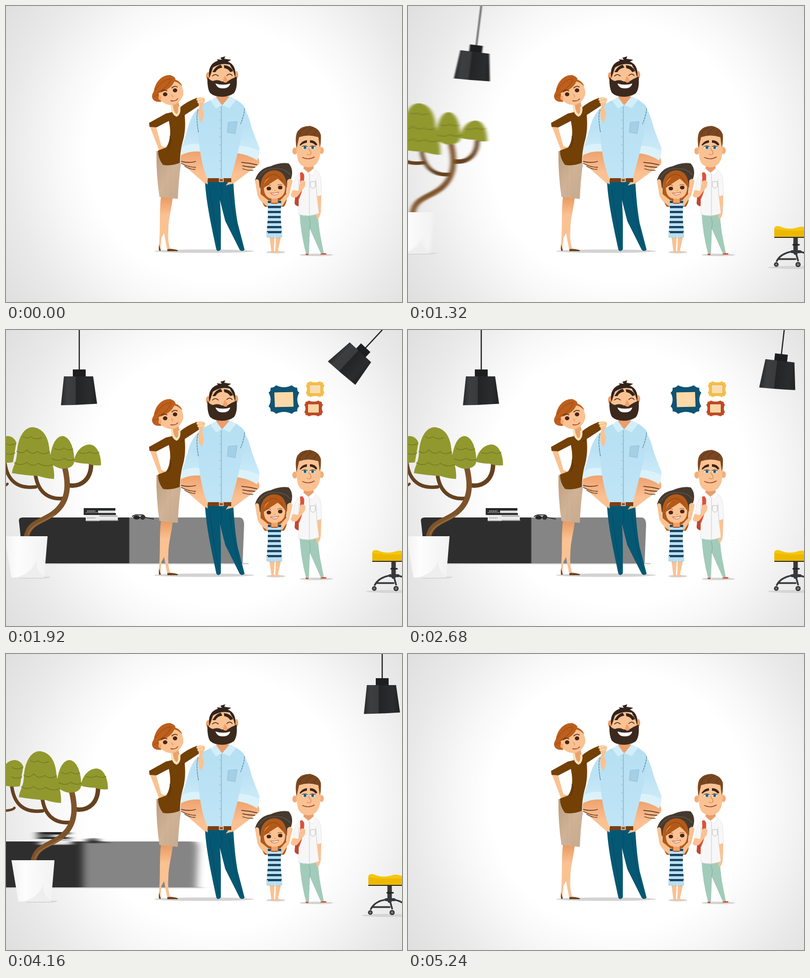
An HTML page for the animation above (5.28 s loop, 800 by 600 pixels).

```html
<!DOCTYPE html>
<html lang="en">
<head>
<meta charset="utf-8">
<title>Family at home</title>
<style>
html, body { margin: 0; width: 100%; height: 100%; overflow: hidden; background: #fff }
svg { display: block; width: 100vw; height: 100vh }
.line { fill: none; stroke-linecap: round; stroke-linejoin: round }
.skin { fill: #fac292 }
</style>
</head>
<body>
<svg viewBox="0 0 800 600">
<defs>
  <radialGradient id="room" gradientUnits="userSpaceOnUse" cx="425" cy="298" r="520">
    <stop offset=".5" stop-color="#fff"/><stop offset=".62" stop-color="#f8f8f8"/>
    <stop offset=".82" stop-color="#e9e9e9"/><stop offset="1" stop-color="#dfdfdf"/>
  </radialGradient>
  <linearGradient id="sleeve" x2="0" y2="1">
    <stop offset=".4" stop-color="#bbe2f4"/><stop offset="1" stop-color="#d3eefa"/>
  </linearGradient>
  <linearGradient id="shirt" x2="0" y2="1">
    <stop stop-color="#b6dff2"/><stop offset="1" stop-color="#bfe5f6"/>
  </linearGradient>
  <linearGradient id="forearm" x2="0" y2="1">
    <stop stop-color="#ee9f6a"/><stop offset=".7" stop-color="#fbc193"/>
  </linearGradient>
  <linearGradient id="skirt" x2="1" y2="1"><stop stop-color="#bd9c7e"/><stop offset=".5" stop-color="#d0b397"/><stop offset="1" stop-color="#c6a98d"/></linearGradient>
  <linearGradient id="leg" x2="0" y2="1"><stop stop-color="#e9985f"/><stop offset=".35" stop-color="#fac292"/></linearGradient>
  <linearGradient id="pot"><stop stop-color="#f1f1f1"/><stop offset=".3" stop-color="#fdfdfd"/><stop offset="1" stop-color="#f2f2f2"/></linearGradient>
  <linearGradient id="shade">
    <stop stop-color="#292a2c"/><stop offset=".17" stop-color="#3d3e40"/><stop offset=".4" stop-color="#3a3b3d"/>
    <stop offset=".42" stop-color="#232425"/><stop offset=".8" stop-color="#2b2c2d"/><stop offset="1" stop-color="#222"/>
  </linearGradient>
  <pattern id="stripes" width="40" height="10.2" y="395" patternUnits="userSpaceOnUse">
    <rect width="40" height="10.2" fill="#bce3f4"/><rect width="40" height="4.400" fill="#173c5b"/>
  </pattern>
  <g id="lamp">
    <path d="M0-40V90" stroke="#222" stroke-width="2.4"/>
    <path d="M-13 88h26v15h-26z" fill="#1d1e1f"/>
    <path d="M-31 102H28L36 157.500Q0 160-37 160.500Z" fill="url(#shade)"/>
  </g>
  <path id="scallop" d="M-27-24Q-20-24-16-29Q-8-25 0-25Q8-25 16-29Q20-24 27-24Q26-17 31-14Q27-7 27 0Q27 7 31 14Q26 17 27 24Q20 24 16 29Q8 25 0 25Q-8 25-16 29Q-20 24-27 24Q-26 17-31 14Q-27 7-27 0Q-27-7-31-14Q-26-17-27-24Z"/>
</defs>

<rect width="800" height="600" fill="url(#room)"/>

<g id="frames"><g>
  <g transform="translate(561.5 141)"><use href="#scallop" fill="#0f5474"/><path d="M-20-15L19-16 20 15-19 16Z" fill="#fbd9a9" stroke="#093f5a"/></g>
  <g transform="translate(624.5 120)"><use href="#scallop" fill="#f4bf48" transform="scale(.61 .55)"/><path d="M-11.500-9h23V9h-23z" fill="#fbdcae" stroke="#e5a52e"/></g>
  <g transform="translate(621.500 159)"><use href="#scallop" fill="#c04a25" transform="scale(.61 .55)"/><path d="M-12-9h23V9h-23z" fill="#fbd5a5" stroke="#9d3618"/></g>
</g></g>

<g id="sofa"><g>
  <path d="M30 472H490V475H60Z" fill="#d2d2d2"/>
  <path d="M26 386Q26 380 34 380H250V473H34Q30 420 26 386Z" fill="#2e2e2f"/>
  <path d="M249 380H472Q481 381 481 395L478 473H249Z" fill="#858585"/>
  <path d="M249 380V473" stroke="#555"/>
  <path d="M157 361H221V366H188V371H222V375H157Z" fill="#292a2b"/>
  <path d="M186 366H220V371H186Z" fill="#dcdcdc"/>
  <path d="M161 376H226V387H161Z" fill="#e9e9e9"/>
  <path d="M189 377H225M189 386H227M162 387H187M161 370h24" stroke="#8a8a8a" stroke-width="1.3"/>
  <path d="M164 381h17M164 367h17" stroke="#aaa" stroke-width="2" stroke-dasharray="3 1"/>
  <path d="M255 378Q262 373 270 375Q279 373 281 380L298 383" class="line" stroke="#333" stroke-width="2"/>
  <ellipse cx="264" cy="380" rx="7" ry="4" fill="#242424"/><ellipse cx="276" cy="380" rx="5" ry="4.500" fill="#303030"/>
</g></g>

<g id="tree"><g>
  <path d="M20 500H90Q88 504 70 504H30Z" fill="#d8d8d8"/>
  <g class="line" stroke="#65411f">
    <path d="M-20 318Q0 317 3 312" stroke-width="5"/>
    <path d="M-3 262C0 300 18 323 60 318" stroke-width="7"/>
    <path d="M59 290C63 325 82 346 120 341" stroke-width="7.500"/>
    <path d="M172 268C173 302 153 318 128 315" stroke-width="9"/>
    <path d="M41 422C45 390 73 388 94 373C125 351 129 318 118 276" stroke="#7d532b" stroke-width="11"/>
    <path d="M45 414C52 393 76 390 97 375" stroke="#94683a" stroke-width="3"/>
  </g>
  <g fill="#91982e">
    <path d="M-32 264C-26 232-12 214 5 215Q17 217 21 228L14 268Q0 271-32 264Z"/>
    <path d="M12 290C14 274 21 270 22 250C24 215 38 197 54 197C74 199 86 215 88 245C92 264 99 284 97 302Q80 301 66 296Q40 295 12 290Z"/>
    <path d="M88 269C90 240 98 215 115 215C130 217 138 242 138 266Q136 282 112 281Q100 279 88 269Z"/>
    <path d="M137 267C140 246 154 232 169 232C184 233 192 252 192 274Q178 276 165 271Q150 271 137 267Z"/>
  </g>
  <g class="line" stroke="#777b25" stroke-width="1.5">
    <path d="M35 216Q43 222 50 216Q60 224 72 218"/>
    <path d="M22 246Q33 253 42 243Q53 255 64 246Q75 255 88 247"/>
    <path d="M17 269Q31 277 42 268Q53 279 65 270Q80 279 94 273"/>
    <path d="M98 240Q108 246 117 239Q126 246 135 241M93 261Q107 268 117 260Q128 267 138 262"/>
    <path d="M148 248Q159 253 169 247Q179 253 188 248M-2 230Q9 236 20 230M-3 249Q8 255 18 249"/>
  </g>
  <path d="M-3 418H84L77 502H11Z" fill="url(#pot)"/>
  <path d="M12 502Q50 500 64 462Q56 484 77 500V502Z" fill="#eee"/>
</g></g>

<g id="people">
  <g fill="#d3d3d3">
    <ellipse cx="400" cy="497" rx="101" ry="3.500"/><ellipse cx="545" cy="499" rx="19" ry="2.500"/><ellipse cx="627" cy="504.500" rx="34" ry="2.500"/>
  </g>

  <g id="man">
    <path d="M402 354H459C461 385 463 412 468 440L482 494Q477 499 472 494L443 436 432 393C435 425 434 462 434 493Q429 500 425 494C417 455 404 400 402 354Z" fill="#055873"/>
    <path d="M432 393Q440 385 433 360M412 372Q419 430 430 485M452 372Q459 435 475 486" class="line" stroke="#084660"/>
    <path d="M355 298Q351 306 354 318L402 360 411 354 398 290Z" fill="url(#forearm)"/>
    <path d="M466 293L510 308Q513 316 511 321L459 360 449 362 454 346Z" fill="url(#forearm)"/>
    <path d="M401 349L409 351 407 362 400 356M459 349L451 354 444 364 456 360" class="skin"/>
    <path d="M394 204C378 213 370 235 367 249L354 290Q354 297 356 301Q372 292 393 295L404 230ZM474 199C487 211 492 230 497 249L512 288Q511 306 507 313Q490 301 464 298L462 225Z" fill="url(#sleeve)"/>
    <path d="M356 286Q372 277 392 280L393 295Q372 293 354 302ZM467 283Q490 283 511 294L508 312Q490 300 466 298Z" fill="#dcf2fb"/>
    <path d="M415 190L462 188Q483 201 483 209C481 245 471 290 454 350H407C393 320 388 270 384 216Q388 202 415 190Z" fill="url(#shirt)"/>
    <path d="M425 183H450L452 188 437 201 424 190Z" fill="#ea9e6c"/>
    <path d="M424 184L436 201 424 208 413 192ZM452 183L437 201 452 207 465 190Z" fill="#d2eefa"/>
    <path d="M435 203V348" stroke="#7da9c3" stroke-width="1.200"/>
    <path d="M432 214V346" stroke="#88b2ca" stroke-width="1.600" stroke-dasharray="1.600 15"/>
    <path d="M449 236L467 234 463 259 447 256Z" fill="#a4cfe4" stroke="#93c0da"/>
    <path d="M388 210Q383 224 389 257M482 208Q481 222 474 239" class="line" stroke="#527e9a" stroke-width="1.200" stroke-dasharray="4 2"/>
    <path d="M408 349H455V357H407Z" fill="#7b3f17"/><path d="M431 350h8v6h-8z" fill="#8b532e" stroke="#ead9b8" stroke-width="1.500"/>
    <path d="M354 315Q369 319 383 315M354 319Q369 327 383 327M361 325Q374 332 382 331M476 317Q492 318 507 322M478 324Q490 327 503 327M478 330Q489 334 499 333" class="line" stroke="#4a2a1b" stroke-width="1.300"/>
    <ellipse cx="408.500" cy="142" rx="4.500" ry="8" fill="#ef9f6a"/><ellipse cx="465" cy="140" rx="4" ry="8" fill="#ef9f6a"/>
    <path d="M412 126Q436 107 462 127L464 158H410Z" class="skin"/>
    <path d="M411 146C408 130 412 116 428 111L426 108 436 109 433 105 443 102 441 107 455 109 448 113C461 117 465 130 463 145L459 131 452 119Q434 114 418 125Z" fill="#33231a"/>
    <path d="M407 143Q411 151 418 152Q428 148 436 153H447Q456 147 466 143Q468 168 460 177Q450 184 437 184Q420 184 412 176Q406 166 407 143Z" fill="#3c291d"/>
    <path d="M423 157Q439 162 453 157Q451 167 438 167Q426 167 423 157Z" fill="#fff"/>
    <path d="M417 134Q424 121 434 119L437 125Q427 126 423 134ZM440 120Q453 120 459 132L453 134Q449 127 441 126Z" fill="#33231a"/>
    <path d="M417 142Q423 136 429 142M446 141Q452 135 457 141" class="line" stroke="#43271b" stroke-width="1.600"/>
    <path d="M442 141Q450 151 446 155Q440 156 438 152" fill="#f0a06c"/>
  </g>

  <g id="woman">
    <path d="M313 386L336 386Q332 412 327 430Q326 452 314 470L312 495 308 493C313 455 309 420 313 386Z" fill="url(#leg)"/>
    <path d="M316 386H337C335 410 328 430 328 454Q326 475 332 494L326 495C321 470 314 440 316 386Z" fill="url(#leg)"/>
    <path d="M309 483L313 496H309ZM326 493Q334 491 347 495V497H326Z" fill="#704019"/>
    <path d="M304 294H351L353 322Q349 350 347 391L310 387Q303 340 304 294Z" fill="url(#skirt)"/>
    <path d="M322 299V386M332 310V389" stroke="#bd9e82" stroke-dasharray="2 1" opacity=".5"/>
    <path d="M290 242L302 241 314 284 327 288 330 291 315 295 309 292Z" class="skin"/>
    <path d="M333 198L348 193 353 213 341 224 335 218Z" fill="#eda16d"/>
    <path d="M336 215L323 218 289 237 290 245 304 246 329 233Q333 252 331 265Q329 280 323 287L307 293Q307 309 317 322Q333 325 351 318C352 302 353 289 357 275Q364 252 361 221L390 202 386 186Q364 194 350 207L344 222Z" fill="#734006"/>
    <path d="M331 264Q337 272 328 288M361 221L354 226" class="line" stroke="#4f2a05"/>
    <path d="M335 203Q337 219 345 222Q351 217 350 206" class="line" stroke="#f5e5b9" stroke-width="5" stroke-dasharray=".1 3.500"/>
    <path d="M385 188Q393 182 402 188Q402 196 396 204L400 220 396 237 390 230 388 214 391 202Z" class="skin"/>
    <path d="M386 190l11-3M388 195l10-2" class="line" stroke="#f3dfad" stroke-width="3" stroke-dasharray=".1 3"/>
    <path d="M309 169Q325 147 347 151Q360 165 358 180Q353 195 340 200Q326 203 314 193L308 185Z" class="skin"/>
    <path d="M314 194Q297 196 295 184C295 177 298 176 299 171C303 151 317 139 332 140Q343 144 342 149Q354 154 356 163Q348 154 340 153C335 165 321 174 309 176Q307 183 314 194Z" fill="#bd5f1d"/>
    <path d="M301 171Q315 149 334 147M307 175Q326 166 333 150M299 184Q304 179 309 180" class="line" stroke="#96460f"/>
    <ellipse cx="311" cy="186" rx="3" ry="4.500" fill="#f1aa76"/>
    <path d="M314 173Q319 168 325 172M335 166Q340 161 346 164" class="line" stroke="#6e3619" stroke-width="1.800"/>
    <g fill="#4a2413"><ellipse cx="321.500" cy="179" rx="4.500" ry="4"/><ellipse cx="341.500" cy="171" rx="4.500" ry="4"/></g>
    <path d="M334 180Q338 182 336 185" class="line" stroke="#df8b59" stroke-width="1.300"/>
    <path d="M333 192Q342 194 347 188" class="line" stroke="#b84a30" stroke-width="1.800"/>
  </g>

  <g id="girl">
    <path d="M503 354C506 342 515 328 534 325Q554 316 571 319Q582 331 576 350L573 366 544 374 514 370Z" fill="#463a2e"/>
    <path d="M510 348Q523 328 543 330Q563 328 574 342" class="line" stroke="#5d5046" stroke-width="1.500"/>
    <path d="M514 372C513 346 526 333 543 333C562 334 570 353 566 378Q570 397 561 407H523Q514 397 514 372Z" fill="#b35a1a"/>
    <path d="M503 354Q507 348 511 354L514 381 530 394 529 407Q512 396 508 384ZM568 354Q575 346 579 355L572 384 557 407 553 395 567 380Z" class="skin"/>
    <path d="M536 385h13v14h-13z" fill="#eda16d"/>
    <path d="M521 365Q523 346 543 346Q562 348 564 366Q564 384 552 389Q541 393 531 389Q520 383 521 365Z" class="skin"/>
    <path d="M519 370Q523 348 545 342Q562 345 566 370Q561 359 549 350Q533 360 519 370Z" fill="#b35a1a"/>
    <path d="M524 352Q533 338 545 342M558 355Q554 346 545 342" class="line" stroke="#8d420f"/>
    <path d="M526 364q5-3 9 0M549 363q5-3 9 0" class="line" stroke="#8d420f"/>
    <g fill="#472416"><ellipse cx="531" cy="370" rx="4.500" ry="3.700"/><ellipse cx="554" cy="368" rx="4.500" ry="3.700"/></g>
    <path d="M534 379Q543 381 551 377Q549 383 542 383Q536 382 534 379Z" fill="#fff" stroke="#b84a30"/>
    <path d="M542 374q3 1 3-1" class="line" stroke="#df8b59"/>
    <path d="M532 466H543L541 497H536ZM545 466H556L549 497H544Z" class="skin"/>
    <ellipse cx="539" cy="498" rx="4" ry="2" class="skin"/><ellipse cx="548" cy="498" rx="4" ry="2" class="skin"/>
    <path d="M529 394H533L536 401H548L552 394H556L555 428 558 468 545 471 543 463 541 471 526 468 529 428Z" fill="url(#stripes)"/>
    <path d="M527 458H557L558 468 545 471 543 463 541 471 526 468Z" fill="#b5dff2"/>
    <path d="M529 459H556" stroke="#173c5b" stroke-width="3"/>
  </g>

  <g id="boy">
    <path d="M585 376Q590 372 600 374L596 405Q586 408 583 400Z" fill="#c4442f"/>
    <path d="M593 418H630Q631 446 637 475L642 501 637 504 614 452 612 502H606Q595 460 593 418Z" fill="#a2cbba"/>
    <path d="M613 452Q617 440 612 428" class="line" stroke="#7fac99"/>
    <path d="M605 502h6v3h-5ZM635 503Q641 499 648 502L646 504H635Z" fill="#dd5138"/>
    <path d="M627 380H637L636 418Q634 429 629 433L626 424Z" class="skin"/>
    <path d="M599 332H624Q635 338 636 352L638 383 628 386 632 420Q611 429 591 422L592 376 581 373Q580 344 599 332Z" fill="#f7f7f7" stroke="#dedede" stroke-width=".7"/>
    <path d="M628 386L626 352M613 337V424M592 352V377" class="line" stroke="#ccc"/>
    <path d="M615 356h10v10l-5 4-5-4z" fill="none" stroke="#bbb"/>
    <path d="M594 338L602 336Q604 358 597 378L592 392 590 381Q596 361 594 338Z" fill="#dc513b"/>
    <path d="M579 373L590 375 595 355Q601 351 605 357L604 366 588 387Q579 391 575 384Z" class="skin"/>
    <path d="M602 320H620L622 331 611 339 601 331Z" fill="#e89d69"/>
    <path d="M600 329L611 338 604 344 597 334ZM622 329L611 338 619 344 626 334Z" fill="#fff" stroke="#ddd" stroke-width=".6"/>
    <ellipse cx="583.500" cy="294" rx="5" ry="7" fill="#f3ad78"/><ellipse cx="637" cy="293" rx="5" ry="7" fill="#f3ad78"/>
    <path d="M587 262H635Q637 303 631 314Q624 327 610 327Q595 326 590 313Q585 295 587 262Z" class="skin"/>
    <path d="M587 289Q583 264 589 254Q597 243 614 243Q632 247 636 261Q637 276 634 287L631 266Q611 259 592 266Z" fill="#794721"/>
    <path d="M593 262Q594 251 607 247M606 260Q608 251 618 248M622 261Q625 254 630 252" class="line" stroke="#5b3210"/>
    <path d="M593 282Q598 273 608 272V277Q600 278 595 283ZM614 272Q625 272 629 281L626 283Q621 277 614 277Z" fill="#3f2415"/>
    <g fill="#fff"><ellipse cx="603.500" cy="287" rx="5" ry="3.500"/><ellipse cx="619.500" cy="287" rx="5" ry="3.500"/></g>
    <g fill="#2f90b4"><circle cx="604" cy="287" r="3.300"/><circle cx="619.500" cy="287" r="3.300"/></g>
    <g fill="#173642"><circle cx="604" cy="287" r="1.500"/><circle cx="619.500" cy="287" r="1.500"/></g>
    <path d="M598 285Q604 282 609 285M614 285Q620 282 625 285" class="line" stroke="#613b25" stroke-width="1.300"/>
    <path d="M611 289Q619 298 615 301Q612 303 608 300" class="line" stroke="#e18c56" stroke-width="1.500"/>
    <path d="M599 307Q611 313 623 306" class="line" stroke="#9d4930" stroke-width="1.500"/>
  </g>
</g>

<g id="chair"><g>
  <ellipse cx="780" cy="530" rx="53" ry="3" fill="#d5d5d5"/>
  <g class="line" stroke="#37383a">
    <path d="M783 470V500" stroke-width="9"/><path d="M778 484H790" stroke="#222" stroke-width="3"/>
    <path d="M783 497Q754 499 745 517M783 497Q812 499 822 517M783 498L788 516M783 513H750" stroke-width="3.500"/>
    <path d="M776 498H792" stroke-width="6"/>
  </g>
  <g fill="#777" stroke="#333" stroke-width="2.500"><circle cx="744" cy="524" r="3.500"/><circle cx="788" cy="524" r="4"/><circle cx="823" cy="524" r="3.500"/></g>
  <path d="M740 450Q743 444 752 447C763 452 772 452 783 450Q795 445 804 449H828V469H740Z" fill="#f5c70d"/>
  <path d="M740 452Q770 458 828 453V469H740Z" fill="#edb900"/>
  <path d="M740 469H828" stroke="#282828" stroke-width="2"/>
</g></g>

<g id="leftLamp"><g><use href="#lamp" y="-8"/></g></g>
<g id="rightLamp"><g><use href="#lamp" y="-39"/></g></g>
</svg>
<script>
const LOOP = 5280, FRAME = 40;

// Keys are time, value pairs; each span eases in and out.
function track(...keys) {
  return t => {
    const next = keys.findIndex(key => key[0] > t);
    if (next === 0) return keys[0][1];
    if (next < 0) return keys[keys.length - 1][1];
    const [t0, v0] = keys[next - 1], [t1, v1] = keys[next];
    const p = (t - t0) / (t1 - t0);
    return v0 + (v1 - v0) * p * p * (3 - 2 * p);
  };
}
const still = () => 0;

const parts = {
  chair: { x: track([800, 130], [1120, -8], [1280, 0], [4000, 0], [4160, -8], [4400, 130]) },
  tree: { x: track([1060, -230], [1420, 14], [1600, 0], [4000, 0], [4160, 14], [4440, -240]) },
  sofa: { x: track([1360, -520], [1720, 14], [1880, 0], [3840, 0], [4047, 14], [4440, -520]) },
  frames: { y: track([1560, -200], [1760, 14], [1880, 0], [3400, 0], [3580, 16], [3800, -200]) },
  leftLamp: {
    hook: [148, 0],
    y: track([1080, -200], [1240, 0], [3640, 0], [3760, 5], [3960, -200]),
    turn: track([1160, 44], [1430, -14], [1640, 8], [1860, 0])
  },
  rightLamp: {
    hook: [760, 0],
    y: track([1760, -200], [1900, 0], [4480, 0], [4580, 5], [4760, -200]),
    turn: track([1880, 46], [2180, -18], [2460, 14], [2880, 0], [4480, 0], [4580, 8], [4760, -10])
  }
};

const defs = document.querySelector('defs');
for (const [name, part] of Object.entries(parts)) {
  defs.insertAdjacentHTML('beforeend', `<filter id="${name}Blur" filterUnits="userSpaceOnUse"
    x="-300" y="-300" width="1400" height="1200" color-interpolation-filters="sRGB"><feGaussianBlur/></filter>`);
  part.outer = document.getElementById(name);
  part.inner = part.outer.firstElementChild;
  part.blur = document.querySelector(`#${name}Blur feGaussianBlur`);
}

function draw(t) {
  for (const [name, part] of Object.entries(parts)) {
    const { x = still, y = still, turn = still, hook = [0, 0] } = part;
    const speed = move => Math.abs(move(t + FRAME / 2) - move(t - FRAME / 2));
    part.inner.setAttribute('transform',
      `translate(${hook[0] + x(t)} ${hook[1] + y(t)}) rotate(${turn(t)})`);
    const blurX = .11 * (speed(x) + 1.2 * speed(turn)), blurY = .11 * speed(y);
    part.blur.setAttribute('stdDeviation', `${blurX} ${blurY}`);
    if (blurX + blurY > .25) part.outer.setAttribute('filter', `url(#${name}Blur)`);
    else part.outer.removeAttribute('filter');
  }
}

const start = performance.now();
function tick() {
  const elapsed = (performance.now() - start) % LOOP;
  draw(Math.floor(elapsed / FRAME) * FRAME);
  requestAnimationFrame(tick);
}
tick();
</script>
</body>
</html>
```
